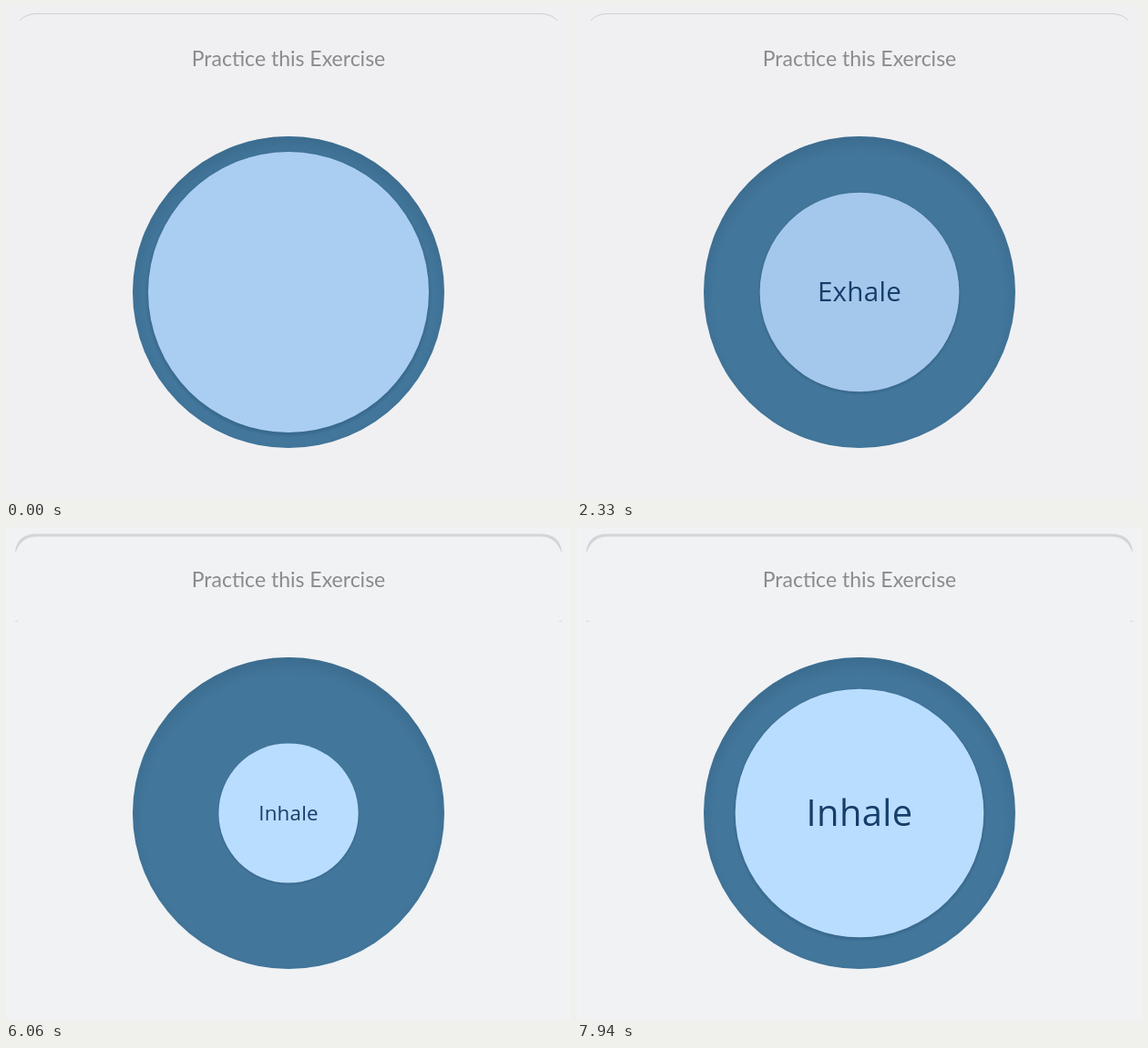
Write an HTML page that moves like this. It is 620 px wide and 541 px high and loops after 8000 ms.

```html
<!DOCTYPE html>
<html lang="en">
<head>
<meta charset="utf-8">
<title>Breathing exercise</title>
<style>
html, body { margin: 0; width: 100%; height: 100%; overflow: hidden; background: #f0f0f2; }
svg { display: block; width: 620px; height: 541px; }
text { text-anchor: middle; }
#title { font: 23px Lato, sans-serif; fill: #8a8b8e; }
#word { font-family: "Open Sans", "Noto Sans", sans-serif; letter-spacing: .01em; fill: #153e69; }
</style>
</head>
<body>
<svg viewBox="0 0 620 541">
  <defs>
    <radialGradient id="drop">
      <stop offset=".95" stop-color="#1d4463" stop-opacity=".42"/>
      <stop offset="1" stop-color="#1d4463" stop-opacity="0"/>
    </radialGradient>
    <radialGradient id="inset" gradientUnits="userSpaceOnUse" cx="310" cy="322" r="181">
      <stop offset=".88" stop-color="#2c5572" stop-opacity="0"/>
      <stop offset="1" stop-color="#2c5572" stop-opacity=".32"/>
    </radialGradient>
  </defs>
  <rect id="page" width="620" height="541"/>
  <path id="thin" d="M15 16Q22 8.5 33 8.5H587Q598 8.5 605 16" fill="none" stroke="#cfcfd1"/>
  <g id="thick" fill="#d3d5d7">
    <path d="M10 27Q12 7.5 34 7.5H586Q608 7.5 610 27L609 27Q603 10.5 586 10.5H34Q17 10.5 11 27Z"/>
    <path d="M10 103h3v1h-3zM607 103h3v1h-3z"/>
  </g>
  <text id="title" x="310" y="66">Practice this Exercise</text>
  <circle cx="310" cy="314" r="171" fill="#42769b"/>
  <circle id="shade" cx="310" cy="314" r="171" fill="url(#inset)"/>
  <g id="ball">
    <circle id="shadow" cy="1.2" r="102.5" fill="url(#drop)"/>
    <circle id="disc" r="100"/>
    <text id="word"></text>
  </g>
</svg>
<script>
const $ = id => document.getElementById(id);
const LOOP = 8000, MOVE = 4000;
const EXHALE = 280, INHALE = 5200, RESET = 4820;
const SMALL = 68.5, LARGE = 154;
const DARK = [164, 200, 236], LIGHT = [185, 221, 255];

const clamp = x => Math.min(1, Math.max(0, x));
const mix = (a, b, k) => a + (b - a) * k;
const ramp = (t, from, to) => clamp((t - from) / (to - from));

// cubic-bezier(.42, 0, .58, 1)
function ease(u) {
  let lo = 0, hi = 1;
  for (let i = 0; i < 24; i++) {
    const s = (lo + hi) / 2, q = 1 - s;
    if (3 * q * q * s * .42 + 3 * q * s * s * .58 + s ** 3 < u) lo = s;
    else hi = s;
  }
  return lo * lo * (3 - 2 * lo);
}

function draw(t) {
  const out = ramp(t, EXHALE, EXHALE + MOVE);
  const into = ramp(t, INHALE, INHALE + MOVE);
  const inhaling = t >= INHALE;
  const u = inhaling ? into : out;
  const r = inhaling ? mix(SMALL, LARGE, ease(into)) : mix(LARGE, SMALL, ease(out));
  $('ball').setAttribute('transform', `translate(310 314) scale(${r / 100})`);

  const light = t < EXHALE ? ramp(t, EXHALE, EXHALE - 1000) : ramp(t, EXHALE + MOVE, INHALE);
  $('disc').setAttribute('fill', `rgb(${DARK.map((c, i) => Math.round(mix(c, LIGHT[i], light)))})`);

  const size = inhaling ? 29.2 : 27;
  const word = $('word');
  word.textContent = inhaling ? 'Inhale' : 'Exhale';
  word.setAttribute('font-size', size);
  word.setAttribute('y', size * .34);
  word.setAttribute('opacity', Math.min(ramp(u, 0, .12), ramp(u, 1, .88)));

  const depth = t < INHALE ? 1 - ramp(t, EXHALE + MOVE, RESET) : ramp(t, INHALE, INHALE + 500);
  $('shade').setAttribute('opacity', depth);
  $('shadow').setAttribute('opacity', depth);

  const fresh = t >= RESET;
  const paper = fresh ? '#f0f2f4' : '#f0f0f2';
  $('page').setAttribute('fill', paper);
  document.body.style.background = paper;
  $('thin').setAttribute('visibility', fresh ? 'hidden' : 'visible');
  $('thick').setAttribute('visibility', fresh ? 'visible' : 'hidden');
}

const start = performance.now();
function tick() {
  draw((performance.now() - start) % LOOP);
  requestAnimationFrame(tick);
}
tick();
</script>
</body>
</html>
```
